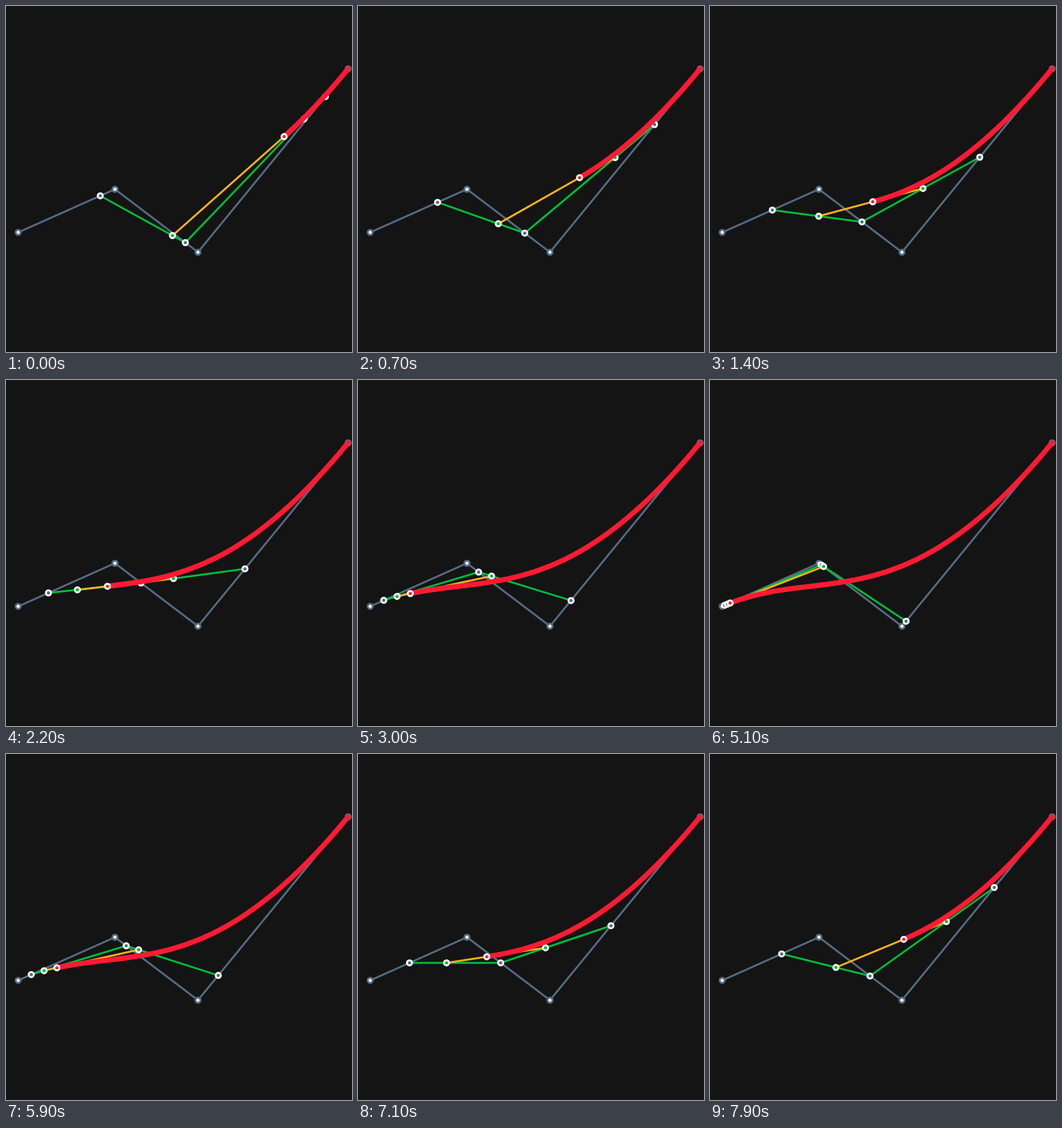
Write an HTML page with a canvas that moves like this. It is 540 px wide and 540 px high and loops after 8 s.

```html
<!DOCTYPE html>
<html lang="en">
<head>
<meta charset="utf-8">
<title>Cubic Bézier construction</title>
<style>
html, body { margin: 0; height: 100%; overflow: hidden; background: #141414; }
canvas { display: block; }
</style>
</head>
<body>
<canvas width="540" height="540"></canvas>
<script>
const ctx = document.querySelector('canvas').getContext('2d');
const SLATE = '#546c82', GREEN = '#00bd39', ORANGE = '#ffb11b', RED = '#ff1a33', WHITE = '#fff';
const control = [[19, 353.3], [170.1, 286], [299.6, 384.3], [534, 98]];
const LOOP = 8000, STEP = 100;

// One de Casteljau step: interpolate between neighbouring points
const reduce = (pts, t) => pts.slice(1).map((p, i) =>
  p.map((v, k) => pts[i][k] + (v - pts[i][k]) * t));

function line(pts, color) {
  ctx.beginPath();
  pts.forEach(p => ctx.lineTo(...p));
  ctx.strokeStyle = color;
  ctx.lineWidth = 3;
  ctx.stroke();
}

function dots(pts, fill, stroke) {
  ctx.fillStyle = fill;
  ctx.strokeStyle = stroke;
  ctx.lineWidth = 3;
  for (const [x, y] of pts) {
    ctx.beginPath();
    ctx.arc(x, y, 4, 0, 2 * Math.PI);
    ctx.fill();
    ctx.stroke();
  }
}

function curve(from, c1, c2, to) {
  ctx.beginPath();
  ctx.moveTo(...from);
  ctx.bezierCurveTo(...c1, ...c2, ...to);
  ctx.strokeStyle = RED;
  ctx.lineWidth = 8;
  ctx.lineCap = 'round';
  ctx.stroke();
  ctx.lineCap = 'butt';
}

function draw(ms) {
  const t = (1 - Math.cos((ms - 4464) * 5.244e-4)) / 2;
  const first = reduce(control, t), second = reduce(first, t), tip = reduce(second, t);

  ctx.fillStyle = '#141414';
  ctx.fillRect(0, 0, 540, 540);
  line(control, SLATE);
  dots(control, WHITE, SLATE);
  line(first, GREEN);
  dots(first, SLATE, WHITE);
  line(second, ORANGE);
  dots(second, GREEN, WHITE);
  curve(tip[0], second[1], first[2], control[3]);
  dots(tip, RED, WHITE);
}

const start = performance.now();
function frame() {
  const ms = (performance.now() - start) % LOOP;
  draw(Math.floor(ms / STEP) * STEP);
  requestAnimationFrame(frame);
}
frame();
</script>
</body>
</html>
```
